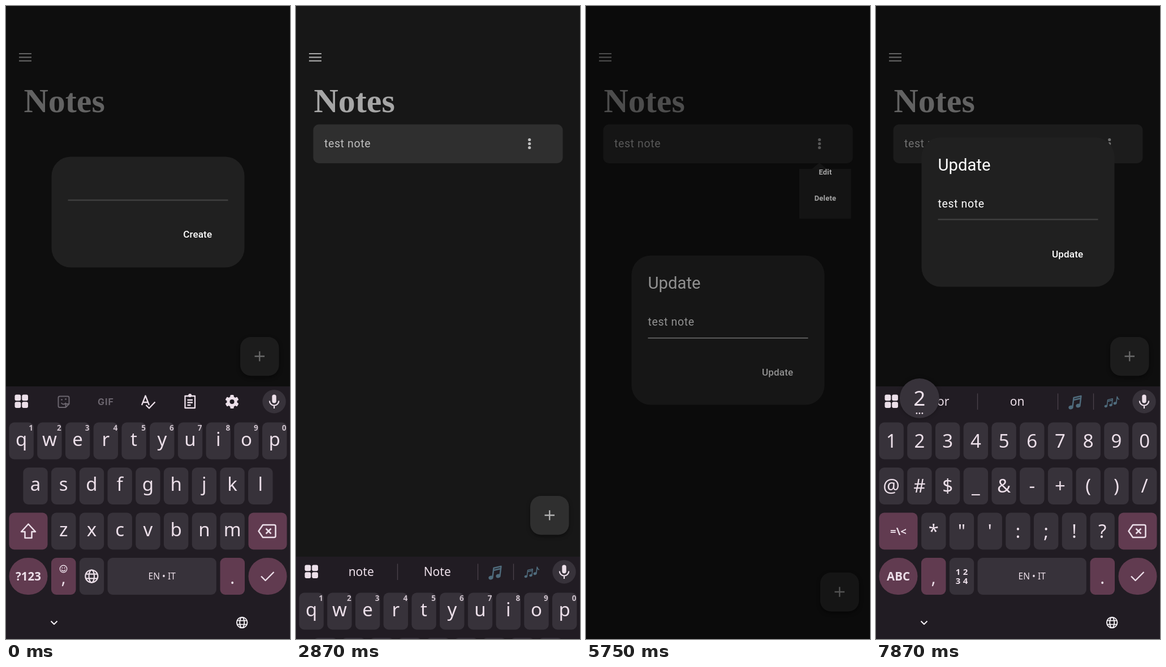
Write an HTML page with a canvas that moves like this. It is 502 px wide and 1115 px high and loops after 8000 ms.

```html
<!DOCTYPE html>
<html lang="en">
<head>
<meta charset="utf-8">
<title>Notes</title>
<style>
  html, body { margin: 0; width: 100%; height: 100%; overflow: hidden; background: #1f1f1f; }
  canvas { display: block; }
</style>
</head>
<body>
<canvas id="stage" width="502" height="1115"></canvas>
<script>
const g = document.getElementById('stage').getContext('2d');
const LOOP = 8000, TICK = 125;
const INK = '#ecdfe9', KEY = '#37323a', ACCENT = '#613b50', PANEL = '#211c23', FAINT = '#6b656e';
const BODY = 'Roboto, sans-serif', KEYS = '"Noto Sans", sans-serif';
const PITCH = 49.72, ROWS = [733.5, 813, 892.5, 972];

// tick, typed text, pressed key, suggestions
const typing = [
  [0, '', '', ''],
  [1, 't', 't', 't the to'],
  [2, 'te', 'e', 'te tell ten'],
  [3, 'te', '', 'te tell ten'],
  [4, 'tes', 's', 'tes test yes'],
  [5, 'test', 't', 'test testing Test'],
  [6, 'test', '', 'test testing Test'],
  [7, 'test ', '', 'on for and'],
  [11, 'test n', 'n', 'n not new'],
  [12, 'test no', 'o', 'no not now'],
  [13, 'test no', '', 'no not now'],
  [14, 'test not', 't', 'not note nothing'],
  [15, 'test note', 'e', 'note Note'],
  [16, 'test note', '', 'note Note'],
  [57, 'test note ', '', 'for on'],
  [63, 'test note ', '2', 'for on']
];

// Linear interpolation through [tick, value] points, held at both ends.
function track(n, ...points) {
  const i = points.findIndex(p => p[0] > n);
  if (i < 0) return points[points.length - 1][1];
  if (i === 0) return points[0][1];
  const [a, u] = points[i - 1], [b, v] = points[i];
  return u + (v - u) * (n - a) / (b - a);
}

function box(x, y, w, h, r, color) {
  g.fillStyle = color;
  g.beginPath();
  g.roundRect(x, y, w, h, r);
  g.fill();
}

function dot(x, y, r, color) {
  g.fillStyle = color;
  g.beginPath();
  g.arc(x, y, r, 0, 7);
  g.fill();
}

function line(d, color = INK, width = 2.4) {
  g.strokeStyle = color;
  g.lineWidth = width;
  g.stroke(new Path2D(d));
}

function text(s, x, y, font, color, align = 'left', spacing = 0) {
  g.font = font;
  g.fillStyle = color;
  g.textAlign = align;
  g.letterSpacing = spacing + 'px';
  g.fillText(s, x, y);
}

const field = (s, x, y) => text(s, x, y, '19.5px ' + BODY, '#fff', 'left', .61);
const button = (s, y) => text(s, 338.7, y, '500 17.1px ' + BODY, '#fff', 'center', .1);

function layer(alpha, draw) {
  if (alpha <= 0) return;
  g.save();
  g.globalAlpha = alpha;
  draw();
  g.restore();
}

function page(hasNote, fabY) {
  g.fillStyle = '#1f1f1f';
  g.fillRect(0, 0, 502, 1115);
  line('M23 84H45M23 90.3H45M23 96.6H45', '#e0e0e0', 2.2);
  text('Notes', 31.5, 187, 'bold 60px "Liberation Serif", serif', '#dfdfdf');
  if (hasNote) {
    box(30.5, 208.5, 441, 68.5, 10, '#3f3f3f');
    field('test note', 50, 249);
    for (const y of [235.5, 242.5, 249.5]) dot(412.7, y, 2.6, '#fff');
  }
  g.save();
  g.shadowColor = 'rgba(0,0,0,.45)';
  g.shadowBlur = 7;
  g.shadowOffsetY = 3;
  box(414, fabY, 68.5, 68.5, 19, '#3f3f3f');
  g.restore();
  line(`M439.5 ${fabY + 34}h17.5m-8.75 -8.75v17.5`, '#f0f0f0', 2.3);
}

function menu() {
  box(377, 287, 91.5, 87.5, 0, '#1b1b1b');
  g.fill(new Path2D('M399 287.2L412.5 276L426 287.2Z'));
  const font = 'bold 13px ' + BODY;
  text('Edit', 423, 297, font, '#fff', 'center', .2);
  text('Delete', 423, 342.5, font, '#fff', 'center', .2);
}

function inputLine(s, y, focused, cursor) {
  field(s, 109.5, y);
  if (focused) line(`M109.5 ${y + 21.5}H392.5`, '#3f3f3f', 2.4);
  else line(`M109.5 ${y + 22.3}H392.5`, '#e4e4e4', 1.2);
  if (!cursor) return;
  const x = 110 + g.measureText(s).width;
  line(`M${x + 1} ${y - 21}v29`, '#444', 2.4);
}

function createDialog(s, cursor) {
  box(80.5, 265.5, 341, 195, 34, '#202020');
  inputLine(s, 320.5, true, cursor);
  button('Create', 408);
}

function updateDialog(s, y, focused, cursor, handle) {
  box(80.5, y, 341, 263, 34, '#202020');
  text('Update', 109.5, y + 58.5, '29.3px ' + BODY, '#fff');
  inputLine(s, y + 123, focused, cursor);
  button('Update', y + 211);
  if (handle) {
    g.save();
    g.translate(191.8, y + 149.2);
    g.rotate(Math.PI / 4);
    box(-13.5, -13.5, 27, 27, [0, 13.5, 13.5, 13.5], '#444');
    g.restore();
  }
}

function globe(x, y, r, color, w) {
  const k = r * .36, h = r * .88;
  g.strokeStyle = color;
  g.lineWidth = w;
  g.beginPath();
  g.arc(x, y, r, 0, 7);
  g.stroke();
  g.beginPath();
  g.ellipse(x, y, r * .43, r, 0, 0, 7);
  g.stroke();
  line(`M${x - h} ${y - k}h${2 * h}M${x - h} ${y + k}h${2 * h}`, color, w);
}

function musicNote(x, y, s, pair) {
  const c = '#4f6b7c';
  g.save();
  g.translate(x, y);
  g.scale(s, s);
  line(pair ? 'M-4 8L-2 -8L11 -11L9 5M-2 -4L10.5 -7' : 'M-1 7L1 -8Q2 -3 6 -1', c, 2.4);
  for (const [hx, hy] of pair ? [[-7, 9], [6, 6]] : [[-4, 8]]) {
    g.fillStyle = c;
    g.beginPath();
    g.ellipse(hx, hy, 4.2, 3.3, -.3, 0, 7);
    g.fill();
  }
  g.restore();
}

function tools() {
  // sticker
  line('M95 687.5h14q2.5 0 2.5 2.5v11l-6 6h-10.5q-2.5 0 -2.5 -2.5v-14.5q0 -2.5 2.5 -2.5M111.5 701h-6v6M97.5 699q4 5 8.5 0M97 693.5h3M104 692.5h3', FAINT, 2);
  text('GIF', 176.5, 702.5, 'bold 16px Inter, sans-serif', FAINT, 'center', 1);
  // spelling
  line('M240 703L246.5 686.5L253 703M242 698h9M247.5 703L253 708.5L263.5 697.5', INK, 2.3);
  // clipboard
  line('M316.5 687h17.5v21h-17.5ZM320.5 694h9.5M320.5 698.5h9.5M320.5 703h6', INK, 2.3);
  dot(325.2, 686, 3, INK);
  // settings
  g.save();
  g.translate(399.5, 697);
  for (let i = 0; i < 3; i++) {
    box(-3.2, -12, 6.4, 24, 1.5, INK);
    g.rotate(Math.PI / 3);
  }
  dot(0, 0, 9.2, INK);
  dot(0, 0, 4, PANEL);
  g.restore();
}

function suggestions(list) {
  const words = list.split(' ');
  const bars = words.length < 3 ? [179.5, 321.5, 384.5] : [179.5, 321.5];
  for (const x of bars) line(`M${x} 682.5v28.5`, '#4a434c', 1.3);
  words.forEach((w, i) => text(w, 115.2 + 134.5 * i, 703.5, '21px ' + KEYS, INK, 'center'));
  if (words.length < 3) {
    musicNote(351.5, 698, 1, true);
    musicNote(411, 699, .66, true);
    musicNote(425.5, 694, .72, false);
  }
}

function keyboard(y, list, pressed, symbols) {
  g.save();
  g.translate(0, y);
  box(0, 670, 502, 445, 0, PANEL);
  for (const x of [15.5, 28.2]) for (const ky of [684.5, 697.3]) box(x, ky, 10.8, 10.8, 3, INK);
  if (list) suggestions(list); else tools();
  dot(474, 696.7, 20.7, KEY);
  box(470.3, 684.5, 7.4, 15, 3.7, INK);
  line('M465.8 695.5a8.2 8.2 0 0 0 16.4 0M474 703.5v5.5', INK, 2.2);

  const rows = symbols ? ['1234567890', '@#$_&-+()/', '*"\':;!?'] : ['qwertyuiop', 'asdfghjkl', 'zxcvbnm'];
  const starts = [27.2, symbols ? 27.2 : 52, 101.8];
  let popup = null;
  rows.forEach((row, r) => [...row].forEach((c, i) => {
    const x = starts[r] + PITCH * i, mid = ROWS[r] + 32.5;
    box(x - 21.7, ROWS[r], 43.4, 65, 9, KEY);
    text(c, x, mid + (symbols ? 11.5 : 8.5), '33px ' + KEYS, INK, 'center');
    if (!symbols && r === 0) text((i + 1) % 10, x + 17, 748, '600 13.5px ' + KEYS, '#cfc3cd', 'center');
    if (c === pressed) popup = [x, mid - 75];
  }));

  // third row edges
  box(5.5, ROWS[2], 68, 65, 9, ACCENT);
  box(428.5, ROWS[2], 68, 65, 9, ACCENT);
  if (symbols) text('=\\<', 39.5, 931.5, '600 18.5px ' + KEYS, INK, 'center');
  else line('M39.5 912.5L52 926H45.5V937H33.5V926H27Z', INK, 2.5);
  line('M446.5 925L454 914h20q2.5 0 2.5 2.5v17q0 2.5 -2.5 2.5h-20ZM459.5 920.5l9 9m0 -9l-9 9', INK, 2.5);

  // bottom row
  const top = ROWS[3];
  box(5.5, top, 68, 65, 32.5, ACCENT);
  box(80, top, 43.5, 65, 9, ACCENT);
  box(129.8, top, 43.4, 65, 9, KEY);
  box(179.5, top, 192.3, 65, 9, KEY);
  box(378.5, top, 43.5, 65, 9, ACCENT);
  box(428.5, top, 68, 65, 32.5, ACCENT);
  text(symbols ? 'ABC' : '?123', 39.5, 1011.5, '600 20.5px ' + KEYS, INK, 'center');
  text(',', 101.7, 1018, '31px ' + KEYS, INK, 'center');
  text('.', 400.2, 1018, '31px ' + KEYS, INK, 'center');
  text('EN • IT', 275.7, 1009.5, '15.5px ' + KEYS, INK, 'center');
  line('M451 1004.5L458.5 1012L473.5 997', INK, 2.4);
  if (symbols) {
    [...'1234'].forEach((c, i) =>
      text(c, 145 + 13 * (i % 2), 1002 + 16 * (i >> 1), '600 15px ' + KEYS, INK, 'center'));
  } else {
    globe(151.3, 1004.5, 11, INK, 2.2);
    line('M95.3 991.5a6.2 6.2 0 1 0 12.4 0a6.2 6.2 0 1 0 -12.4 0M98 993q3.5 4.5 7 0', INK, 1.4);
    dot(99.4, 989.8, 1, INK);
    dot(103.6, 989.8, 1, INK);
  }
  line('M79.5 1083.5L85 1089L90.5 1083.5', '#f4f0f4', 2);
  globe(417.2, 1086, 9.3, '#f4f0f4', 1.9);

  if (popup) {
    const [x, py] = popup;
    g.save();
    g.shadowColor = 'rgba(0,0,0,.35)';
    g.shadowBlur = 6;
    dot(x, py, 35, KEY);
    g.restore();
    text(pressed, x, py + 12.5, '37px ' + KEYS, INK, 'center');
    for (const d of [-5, 0, 5]) dot(x + d, py + 26.5, 1.4, INK);
  }
  g.restore();
}

function draw(n) {
  const [, typed, pressed, list] = typing.filter(s => s[0] <= n).pop();
  const kbY = track(n, [21, 0], [22, 90], [23, 300], [24, 445], [51, 445], [52, 330], [53, 82], [54, 0]);
  const fabY = 583 + track(n, [21, 0], [22, 80], [23, 280], [24, 415], [51, 415], [52, 380], [53, 136], [54, 0]);
  const scrim = track(n, [20, .56], [21, .52], [22, .38], [25, 0], [36, 0], [37, .3], [38, .5],
    [45, .5], [46, .66], [47, .56]);
  const dialogY = track(n, [52, 439.5], [53, 379.5], [54, 290], [55, 245], [56, 231.5]);

  page(n >= 22, fabY);
  g.fillStyle = `rgba(0,0,0,${scrim})`;
  g.fillRect(0, 0, 502, 1115);
  layer(track(n, [36, 0], [38, 1], [45, 1], [46, .62], [47, 0]), menu);
  layer(track(n, [20, 1], [21, .8], [22, .2], [23, 0]), () => createDialog(typed, n > 0 && n < 21));
  layer(track(n, [45, 0], [46, .53], [47, 1]), () =>
    updateDialog(typed, dialogY, n >= 52, n >= 52 && n < 61, n >= 52 && n < 57));
  if (kbY < 445) keyboard(kbY, list, pressed, n >= 60);
}

function frame(now) {
  const t = now % LOOP;
  draw(Math.min(LOOP / TICK - 1, Math.floor((t + 5) / TICK)));
  requestAnimationFrame(frame);
}

g.lineJoin = 'round';
requestAnimationFrame(frame);
</script>
</body>
</html>
```
